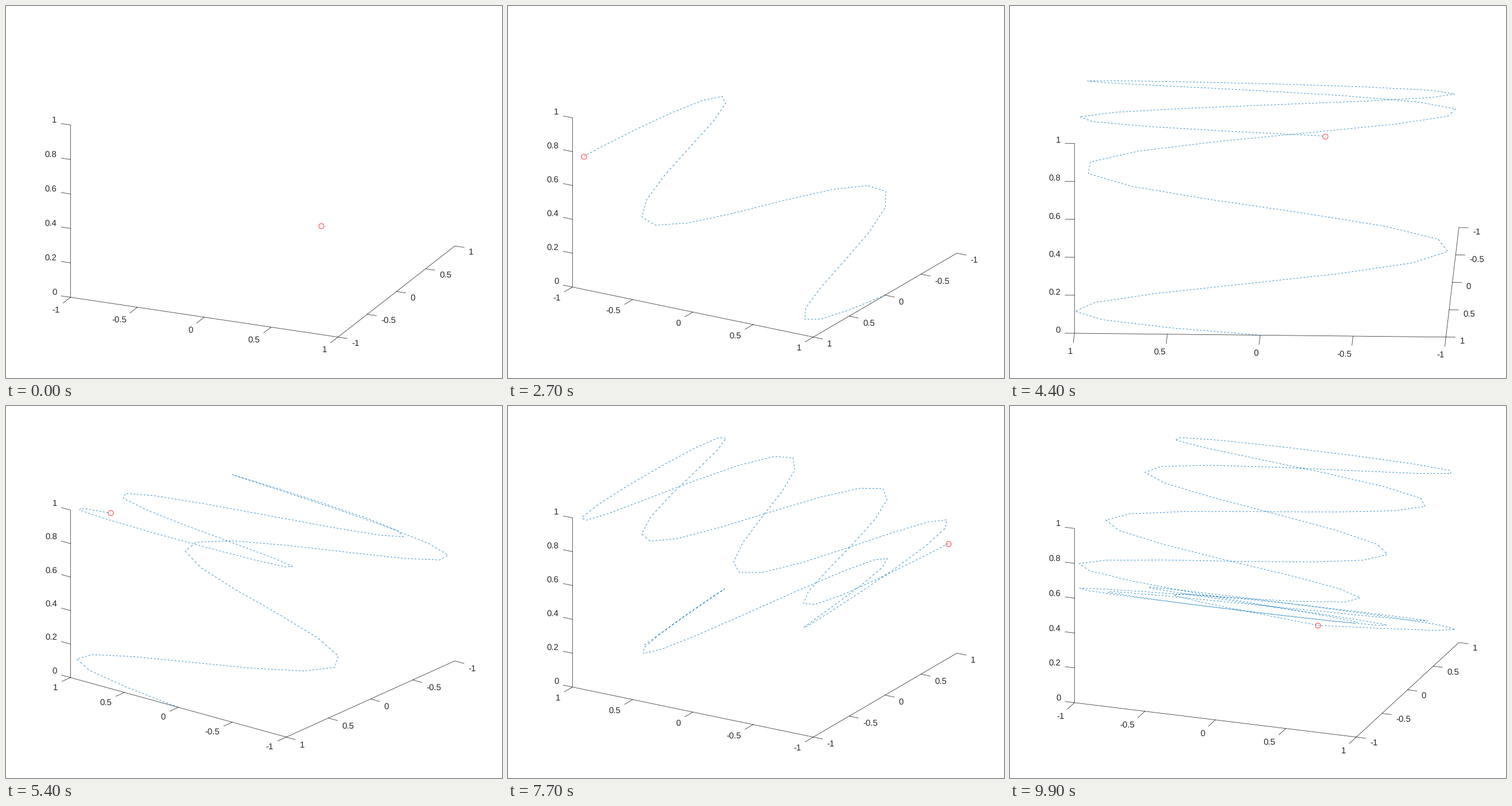
Recreate the animation shown at these times as a matplotlib script. Size 864 px wide and 648 px high, loop 10 s.

```python
import numpy as np
import matplotlib.pyplot as plt
from matplotlib.animation import FuncAnimation

W, H = 864, 648
FRAMES = 100
LEFT, RIGHT = 0.13 * W, 0.905 * W
TOP, BOTTOM = 0.075 * H, 0.89 * H
ELEV = np.radians(30)
TICK = 0.025 * (RIGHT - LEFT)
LABEL = TICK + 7.5
DASH = 3
INK = "#262626"
XY_TICKS = np.linspace(-1, 1, 5)
Z_TICKS = np.linspace(0, 1, 6)

plt.rcParams.update({
    "font.family": "Liberation Sans",
    "font.size": 15,
    "text.hinting": "none",
    "path.simplify": False,
})

# The curve that the marker follows
t = np.linspace(0, 2 * np.pi, FRAMES)
curve = np.array([np.sin(8 * t), np.cos(2 * t), np.sin(t / 2)])

fig = plt.figure(figsize=(W / 72, H / 72), dpi=72, facecolor="white")
ax = fig.add_axes([0, 0, 1, 1])
ax.set_xlim(0, W)
ax.set_ylim(H, 0)
ax.axis("off")

thin = dict(lw=0.75, snap=False, solid_capstyle="butt")
frame_line, = ax.plot([], [], color=INK, **thin)
trail, = ax.plot([], [], color="#0072BD", **thin)
marker, = ax.plot([], [], "o", ms=9, mfc="none", mec="red", mew=0.75,
                  snap=False)


def make_labels(values, ha):
    return [ax.text(0, 0, f"{v:.2g}", color=INK, ha=ha, va="baseline")
            for v in values]


left_labels = make_labels(XY_TICKS, "right")
right_labels = make_labels(XY_TICKS, "left")
z_labels = make_labels(Z_TICKS, "right")


def projector(az):
    """Orthographic view of the box, stretched to fill the plot area."""
    c, s = np.cos(az), np.sin(az)
    span = abs(c) + abs(s)
    kx = (RIGHT - LEFT) / (2 * span)
    k = (BOTTOM - TOP) / (np.cos(ELEV) + np.sin(ELEV) * span)
    depth = k * np.sin(ELEV) / 2
    rise = k * np.cos(ELEV)
    mid = (LEFT + RIGHT) / 2
    ground = BOTTOM - depth * span

    def project(x, y, z):
        return np.array([mid + kx * (x * c + y * s),
                         ground - depth * (y * c - x * s) - rise * z])
    return project


def stipple(pts):
    """Cut a polyline into dashes, counted along each step's longer axis."""
    steps = np.abs(np.diff(pts)).max(axis=0)
    dist = np.concatenate([[0], np.cumsum(steps)])
    knots = np.union1d(dist, np.arange(0, dist[-1], DASH / 2))
    out = np.array([np.interp(knots, dist, p) for p in pts])
    out[:, knots % (2 * DASH) > DASH] = np.nan
    return out


def unit(v):
    return v / np.hypot(*v)


def place(base, direction, labels, drop, path):
    """Add one axis' ticks to the path and move its labels."""
    for p, label in zip(base, labels):
        path.extend([p, p + TICK * direction, (np.nan, np.nan)])
        label.set_position(p + LABEL * direction + (0, drop))


def update(n):
    az = np.radians(20 + 3.6 * (n + 1))
    project = projector(az)

    # Nearest corner of the floor and its two neighbours
    fx, fy = np.sign(np.sin(az)), -np.sign(np.cos(az))
    left, right = sorted([(-fx, fy), (fx, -fy)],
                         key=lambda q: project(*q, 0)[0])
    front = project(fx, fy, 0)
    p_left, p_right = project(*left, 0), project(*right, 0)
    top = project(*left, 1)
    to_front = unit(front - p_left)
    to_right = unit(p_right - front)

    def edge(corner):
        if corner[0] != fx:
            return [project(v, fy, 0) for v in XY_TICKS]
        return [project(fx, v, 0) for v in XY_TICKS]

    path = [top, p_left, front, p_right, (np.nan, np.nan)]
    place(edge(left), -to_right, left_labels, 11.5, path)
    place(edge(right), to_front, right_labels, 11.5, path)
    place([project(*left, v) for v in Z_TICKS], -to_front, z_labels, -1, path)
    frame_line.set_data(*np.array(path).T)

    pts = project(*curve[:, :n + 1])
    trail.set_data(*stipple(pts))
    marker.set_data(*pts[:, -1:])
    return [frame_line, trail, marker, *left_labels, *right_labels, *z_labels]


anim = FuncAnimation(fig, update, frames=FRAMES, interval=100, repeat=True)
plt.show()
```
